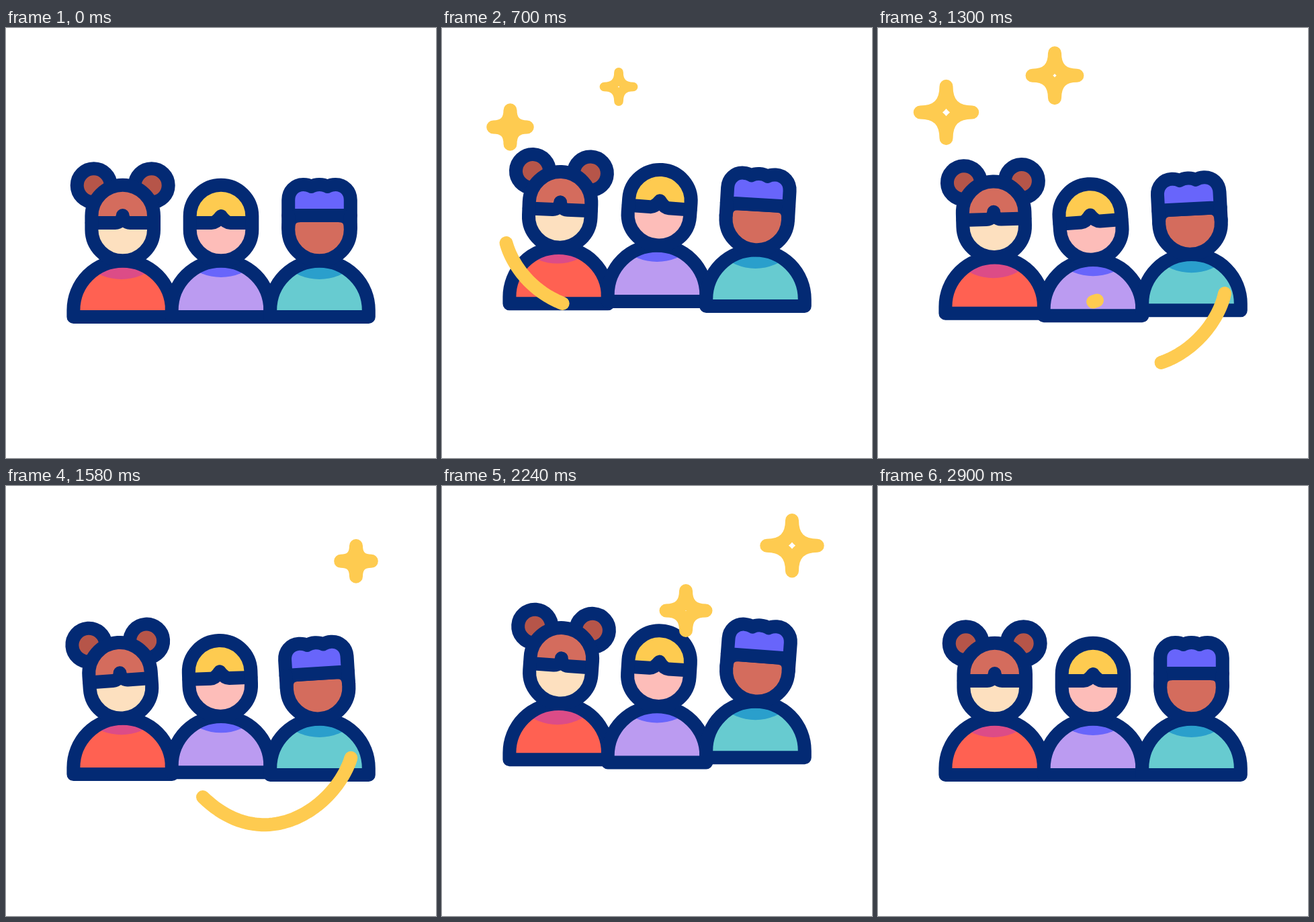
An HTML page with a canvas for the animation above (3040 ms loop, 640x640 px).

```html
<!DOCTYPE html>
<html lang="en">
<head>
<meta charset="utf-8">
<title>Three friends</title>
<style>
  html, body { margin: 0; width: 100%; height: 100%; overflow: hidden; background: #fff; }
  canvas { display: block; width: 100vmin; height: 100vmin; }
</style>
</head>
<body>
<canvas id="stage" width="640" height="640"></canvas>
<script>
const ctx = document.getElementById('stage').getContext('2d');
const LOOP = 3040;
const NECK_Y = 338;
const NAVY = '#032a74';
const YELLOW = '#fecb50';

const clamp = v => Math.max(0, Math.min(1, v));
const ease = (t, from, to) => (1 - Math.cos(Math.PI * clamp((t - from) / (to - from)))) / 2;

// Figure outlines, with x measured from the middle of the figure.
const BODY = new Path2D('M-73.3,430V420A73.3,73.3 0 0 1 73.3,420V430Z');
const HEAD = new Path2D('M-46.3,280A46.3,46.3 0 0 1 46.3,280V300A46.3,46.3 0 0 1 -46.3,300Z');
const CAP = new Path2D('M-46.3,290V280A46.3,46.3 0 0 1 46.3,280V290Z');
const BUN_FRINGE = new Path2D('M-46,290H-11A11,11 0 0 0 0,279A11,11 0 0 0 11,290H46');
const WAVE_FRINGE = new Path2D('M-46,290H-14Q-7,290 0,280Q7,290 14,290H46');
const FACE = new Path2D('M-46.3,300V297Q-46,279 -28,279H28Q46,279 46.3,297V300A46.3,46.3 0 0 1 -46.3,300Z');
const QUIFF = new Path2D('M-46.3,279V256C-46.3,243 -37,233 -24,233Q-17,233 -12,236Q-7,233 0,233' +
  'Q7,233 12,236Q17,233 24,233C37,233 46.3,243 46.3,256V279Z');
const TEMPLES = new Path2D('M-46.3,279V298M46.3,279V298');

function fill(path, color) {
  ctx.fillStyle = color;
  ctx.fill(path);
}

function outline(path) {
  ctx.strokeStyle = NAVY;
  ctx.lineWidth = 20;
  ctx.stroke(path);
}

function disc(x, y, r) {
  const path = new Path2D();
  path.arc(x, y, r, 0, Math.PI * 2);
  return path;
}

function hoodedHead(skin, hair, fringe) {
  fill(HEAD, skin);
  fill(CAP, hair);
  outline(fringe);
  outline(HEAD);
}

function bunHead() {
  for (const x of [-43, 43]) {
    const bun = disc(x, 234.3, 25);
    fill(bun, '#b65549');
    outline(bun);
  }
  hoodedHead('#fde0bf', '#d46c5d', BUN_FRINGE);
}

function blondeHead() {
  hoodedHead('#fdbdb9', '#fecb50', WAVE_FRINGE);
}

function quiffHead() {
  fill(FACE, '#d46c5d');
  outline(FACE);
  fill(QUIFF, '#6865fb');
  outline(QUIFF);
  outline(TEMPLES);
}

const people = [
  { x: 173.7, start: 298, collarStart: 220, height: 25.5, tiltDelay: 228, shirt: '#ff6152',
    collar: '#dc4c87', collarX: -2, collarY: 298, head: bunHead },
  { x: 320, start: 220, collarStart: 220, height: 25, tiltDelay: 0, shirt: '#bb9bf1',
    collar: '#6865fb', collarX: 0, collarY: 295, head: blondeHead },
  { x: 466.5, start: 365, collarStart: 365, height: 26.5, tiltDelay: 148, shirt: '#67cbd0',
    collar: '#2a9fcc', collarX: 0, collarY: 298, head: quiffHead }
];

// Two hops, as a share of the full height.
function hop(t) {
  return ease(t, 0, 590) - ease(t, 590, 1180) + ease(t, 1210, 1815) - ease(t, 1815, 2420);
}

// Degrees: lean right, left, right, then upright again.
function tilt(t) {
  return 4.3 * ease(t, 220, 700) - 8.5 * ease(t, 700, 1300)
    + 8.5 * ease(t, 1300, 2100) - 4.3 * ease(t, 2100, 2620);
}

function drawPerson(p, t) {
  const rise = p.height * hop(t - p.start);
  const collarRise = p.height * hop(t - p.collarStart);
  ctx.save();
  ctx.translate(p.x, -rise);

  fill(BODY, p.shirt);
  ctx.save();
  ctx.clip(BODY);
  fill(disc(p.collarX, p.collarY + rise - collarRise, 76), p.collar);
  ctx.restore();
  outline(BODY);

  ctx.translate(0, NECK_Y);
  ctx.rotate(tilt(t - p.tiltDelay) * Math.PI / 180);
  ctx.translate(0, -NECK_Y);
  p.head();
  ctx.restore();
}

const stars = [
  { x: 101.5, y: 151.5, start: 380, end: 1350 },
  { x: 263, y: 87, start: 660, end: 1570 },
  { x: 363, y: 195.5, start: 1748, end: 2710 },
  { x: 521, y: 112.8, start: 1395, end: 2330 }
];

function drawStar(s, t) {
  if (t <= s.start || t >= s.end) return;
  const r = 21.5 + 18 * ease(t, s.start, s.start + 1060);
  const grown = r - 22;
  ctx.save();
  ctx.translate(s.x, s.y - 1.15 * grown - 0.024 * grown * grown);
  ctx.beginPath();
  ctx.moveTo(0, -r);
  ctx.quadraticCurveTo(0, 0, r, 0);
  ctx.quadraticCurveTo(0, 0, 0, r);
  ctx.quadraticCurveTo(0, 0, -r, 0);
  ctx.quadraticCurveTo(0, 0, 0, -r);
  ctx.closePath();
  ctx.strokeStyle = YELLOW;
  ctx.lineWidth = 20 * clamp((t - s.start) / 60) * clamp((s.end - t) / 40);
  ctx.stroke();
  ctx.restore();
}

const streaks = [
  { start: 375, points: [[95.5, 320], [111, 376], [184, 455], [326, 405.5]] },
  { start: 981, points: [[516, 395], [500, 470], [390, 557.5], [293, 463]] }
];

function bezier([a, b, c, d], u) {
  const v = 1 - u;
  return [0, 1].map(i =>
    v * v * v * a[i] + 3 * v * v * u * b[i] + 3 * v * u * u * c[i] + u * u * u * d[i]);
}

function drawStreak(s, t) {
  const front = ease(t, s.start, s.start + 600);
  const back = ease(t, s.start + 545, s.start + 957);
  if (front <= back) return;
  ctx.beginPath();
  for (let i = 0; i <= 48; i++) {
    ctx.lineTo(...bezier(s.points, back + (front - back) * i / 48));
  }
  ctx.strokeStyle = YELLOW;
  ctx.lineWidth = 20;
  ctx.stroke();
}

function draw(t) {
  ctx.fillStyle = '#fff';
  ctx.fillRect(0, 0, 640, 640);
  ctx.lineCap = ctx.lineJoin = 'round';
  people.forEach(p => drawPerson(p, t));
  streaks.forEach(s => drawStreak(s, t));
  stars.forEach(s => drawStar(s, t));
}

const began = performance.now();
function tick() {
  draw((performance.now() - began) % LOOP);
  requestAnimationFrame(tick);
}
tick();
</script>
</body>
</html>
```
